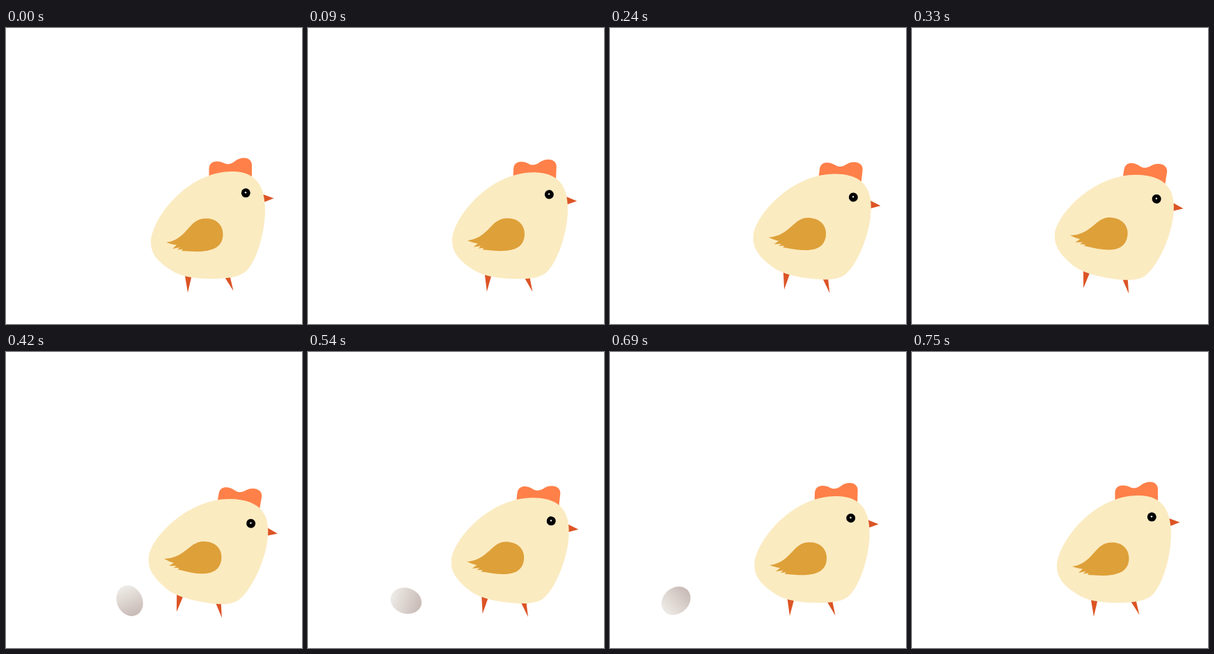
Animation of 425x425 px, one loop 780 ms. Source, as an HTML page:

```html
<!DOCTYPE html>
<html lang="en">
<head>
<meta charset="utf-8">
<title>Hen and egg</title>
<style>
  html, body { margin: 0; height: 100%; overflow: hidden; background: #fff; }
  svg { display: block; width: 100%; height: 100%; }
</style>
</head>
<body>
<svg viewBox="0 0 425 425">
  <defs>
    <linearGradient id="shell">
      <stop offset="0" stop-color="#eeebe6"/>
      <stop offset="1" stop-color="#c8bab6"/>
    </linearGradient>
  </defs>
  <ellipse id="egg" rx="22.6" ry="18.4" fill="url(#shell)"/>
  <g id="hen">
    <path fill="#dc5425" d="M256 350L268 350 261 380ZM309 350L320 350 326.5 377.5ZM368 238.500L384.500 244.500 368 251Z"/>
    <path fill="#ff8049" d="M291.500 214V202C292 190 305 190 313 194C319 197 324 195 329 191C338 184 352 185 353 196V214Z"/>
    <path fill="#fbebc1" d="M208 308C208 276 258 206 325 206C360 206 372 228 372 262C372 290 362 330 346 348C336 358 318 360 295 360C262 360 246 354 236 347C218 336 208 324 208 308Z"/>
    <path fill="#dea039" d="M230 308C250 305 258 291 268 281C276 274 282 273.500 288 273.500C302 273.500 311.500 283 311.500 296C311.500 314 298 321 272 321L252 320 254 317.500 246 318.500 249.500 315 239 317 245 311.500C240 311 236 310 230 308Z"/>
    <circle cx="344.300" cy="236.800" r="6.500"/>
    <circle cx="344" cy="236.300" r="1.300" fill="#ddd"/>
  </g>
</svg>
<script>
  const LOOP = 780, STEP = 30, PEAK = 390, END = 750, TILT = 10.8;
  const hen = document.getElementById('hen');
  const egg = document.getElementById('egg');

  function draw() {
    const t = Math.floor(performance.now() % LOOP / STEP) * STEP;

    // The hen leans forward, then rocks back while the egg rolls away.
    const lean = t < PEAK ? t / PEAK : (END - t) / (END - PEAK);
    hen.setAttribute('transform', `rotate(${TILT * lean} 294 284)`);

    const rolled = (t - PEAK) / STEP;
    egg.setAttribute('visibility', t >= PEAK && t < END ? 'visible' : 'hidden');
    egg.setAttribute('transform', `translate(${186.8 - 9.2 * rolled} 357.2) rotate(${78 - 12 * rolled})`);

    requestAnimationFrame(draw);
  }
  draw();
</script>
</body>
</html>
```
